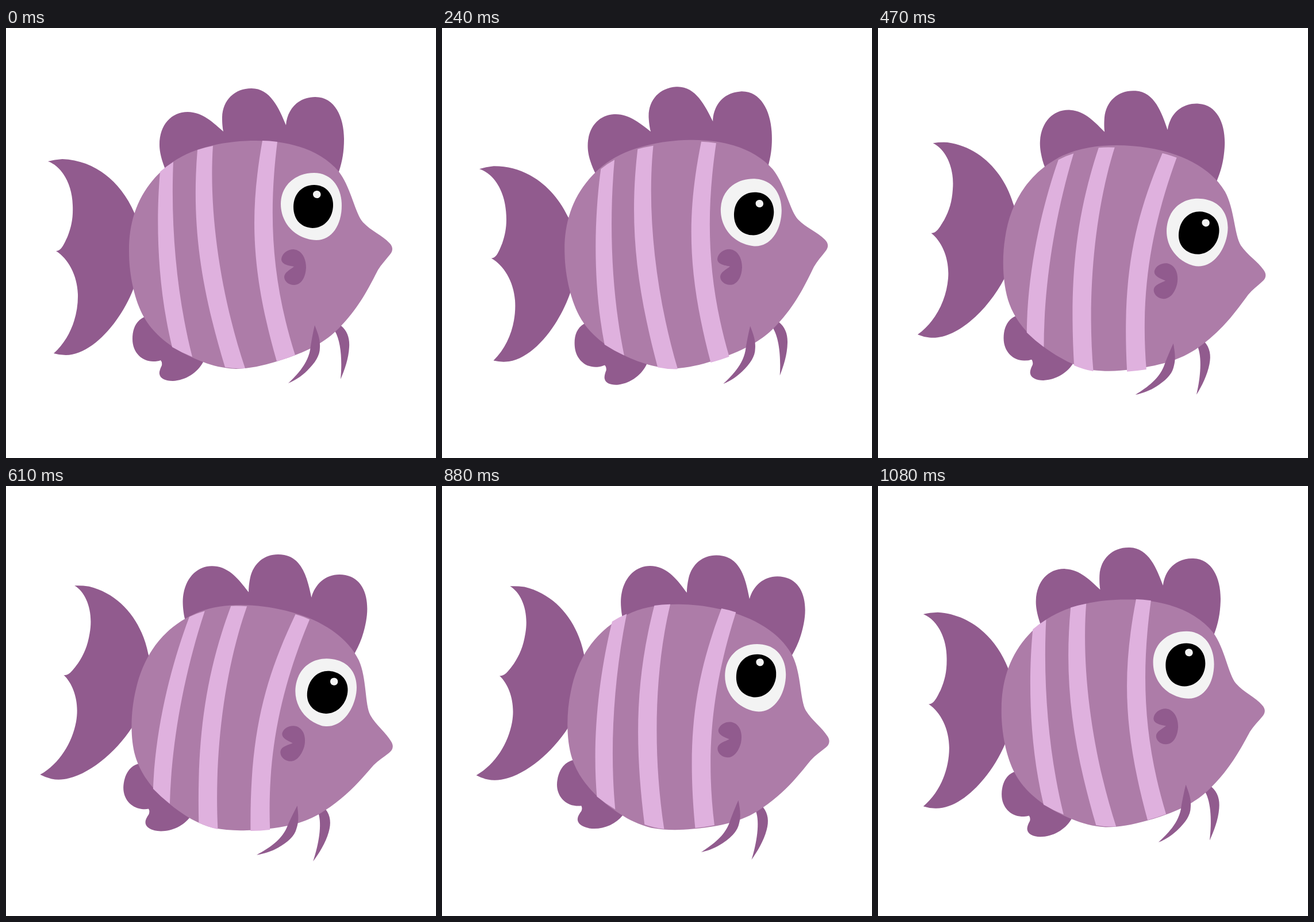
Recreate the animation shown at these times as an HTML page. Size 748 by 748 pixels, loop 1.11 s.

```html
<!DOCTYPE html>
<html lang="en">
<head>
<meta charset="utf-8">
<title>Swimming fish</title>
<style>
  html, body { margin: 0; width: 100%; height: 100%; overflow: hidden; background: #fff; }
  svg { display: block; width: 100%; height: 100%; }
</style>
</head>
<body>
<svg id="stage" viewBox="0 0 748 748"></svg>
<script>
const LOOP = 1110, STEP = LOOP / 33;
// The swing is cut slightly short when the loop restarts
const PERIOD = 1117, SWING = 16, PIVOT = '374 422';
const DARK = '#915b8e', SKIN = '#ad7ca8', STRIPE = '#dfb1de', WHITE = '#f3f3f3';

// Back to front: colour, delay of the swing in ms, outline at time 0
const parts = [
  // tail
  [DARK, 177, `M73 232Q84 229 98 228C155 230 200 268 223 321L260 390L222 453
    C200 510 150 569 104 569Q93 569 83 566C112 540 126 500 125 463
    C124 430 108 401 87 388C97 388 102 373 107 363C114 345 117 330 116 308
    C115 270 96 240 73 232Z`],
  // back fin
  [DARK, 200, `M285 262L276 243C268 222 267 210 267 203C267 168 288 146 316 146
    C342 146 362 166 378 180C376 170 376 160 376 155C377 125 398 105 427 105
    C460 105 475 140 487 169C489 142 508 120 538 120C572 120 588 155 588 193
    C588 215 585 232 579 250L572 275L420 300Z`],
  // belly fin
  [DARK, 229, `M255 497L240 503C225 510 220 525 220 541C220 565 237 580 256 580
    Q264 580 269 578Q272 581 271 587Q266 597 267 602C268 610 278 614 290 614
    C312 613 333 600 343 581L355 555L300 510Z`],
  // far whisker
  [DARK, 160, `M583 518C594 527 598 540 597 555C596 575 589 595 582 611
    C585 580 583 545 572 527L560 505L575 508Z`],
  // body
  [SKIN, 146, `M214 390C213 330 234 273 290 233C330 206 385 196 435 196
    C495 196 548 213 579 250C600 277 607 322 621 338C635 353 655 361 667 374
    C674 381 673 388 668 394C661 403 653 411 647 421C633 448 616 484 582 519
    C560 543 530 562 471 580C445 588 425 592 400 593C378 592 358 587 343 581
    C305 567 262 542 240 503C224 475 214 430 214 390Z`],
  // stripes
  [STRIPE, 53, `M268 250C261 330 262 445 289 555Q306 565 324 572
    C298 470 286 350 291 233Q278 241 268 250Z`],
  [STRIPE, 70, `M333 212C322 345 340 455 381 590Q398 593 416 592
    C375 470 352 325 360 205Q345 208 333 212Z`],
  [STRIPE, 87, `M446 196C424 320 425 420 471 580Q488 575 503 569
    C462 440 456 325 472 198Q458 196 446 196Z`],
  // eye, pupil, glint
  [WHITE, 35, `M478 306C478 274 503 252 536 252C566 252 584 277 584 309
    C584 342 567 369 540 369C505 368 478 341 478 306Z`],
  ['#000', 18, `M500 311C500 290 514 273 536 273C556 273 569 288 569 308
    C569 330 554 348 533 348C511 347 500 331 500 311Z`],
  [WHITE, 0, `M534 289C534 285 538 283 541 283C545 283 547.5 286 547.5 290
    C547 294 544 296 541 296C537 296 534 293 534 289Z`],
  // side fin
  [DARK, 120, `M501 415C490 413 479 411 479 402C480 392 490 385 500 385
    C514 386 522 400 522 417C521 435 513 447 501 447C491 447 484 440 484 433
    C484 425 495 420 501 415Z`],
  // near whisker
  [DARK, 105, `M537 517C542 530 547 541 546 556C546 570 538 582 524 596
    C515 605 503 613 491 618C510 600 525 582 529 560C531 545 534 530 537 517Z`]
];

const stage = document.getElementById('stage');
const shapes = parts.map(([fill, delay, d]) => {
  const node = document.createElementNS('http://www.w3.org/2000/svg', 'path');
  node.setAttribute('fill', fill);
  node.setAttribute('d', d);
  stage.append(node);
  return { node, delay };
});

const ease = u => u < .5 ? (2 * u) ** 2.4 / 2 : 1 - (2 - 2 * u) ** 2.4 / 2;

// Down in the first half of the period, back up in the second
function angle(t) {
  const u = ((t + PERIOD) % PERIOD) / PERIOD * 2;
  return SWING * ease(u < 1 ? u : 2 - u);
}

function draw(now) {
  const t = Math.floor((now % LOOP + 5) / STEP) % 33 * STEP;
  for (const { node, delay } of shapes) {
    const turn = angle(t - delay) - angle(-delay);
    node.setAttribute('transform', `rotate(${turn.toFixed(3)} ${PIVOT})`);
  }
}

let start;
function tick(now) {
  start ??= now;
  draw(now - start);
  requestAnimationFrame(tick);
}
draw(0);
requestAnimationFrame(tick);
</script>
</body>
</html>
```
